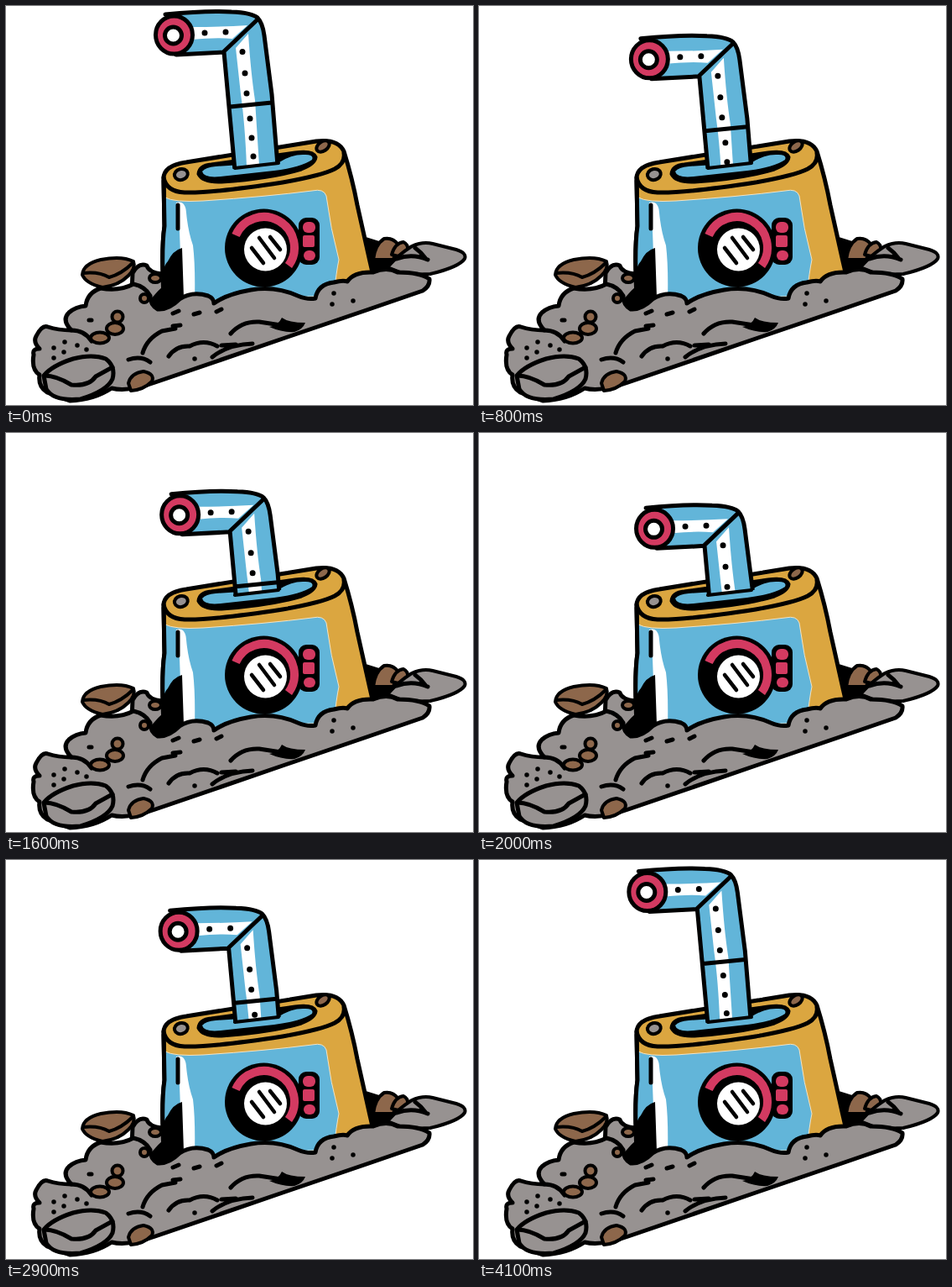
An HTML page that plays this animation: 557x475 px, repeating every 4200 ms.

```html
<!DOCTYPE html>
<html>
<head>
<meta charset="utf-8">
<style>
  html, body { margin: 0; width: 100%; height: 100%; overflow: hidden; background: #fff; }
  svg { display: block; width: 100vw; height: 100vh; stroke: #000; stroke-width: 5; stroke-linecap: round; stroke-linejoin: round; fill: none; }
  .blue { fill: #62b5d9; }
  .gold { fill: #dba640; }
  .red { fill: #d33a61; }
  .gray { fill: #979291; }
  .brown { fill: #8d674b; }
  .white { fill: #fff; }
  .ink { fill: #000; }
  .flat { stroke: none; }
  .thin { stroke-width: 4; }
</style>
</head>
<body>
<svg viewBox="0 0 557 475">
  <clipPath id="hole"><path d="M0-20H557V158L327 187 269 194 0 228Z"/></clipPath>

  <!-- rocks behind -->
  <path class="ink" d="M430 278L446 283 470 300 480 318 430 325Z"/>
  <g class="thin">
    <path class="brown" d="M438 302Q440 284 451 277Q461 275 468 284L462 302Z"/>
    <path class="brown" d="M460 296Q464 282 474 281Q480 284 479 290L468 298Z"/>
    <path class="gray" d="M455 311Q468 296 484 286Q497 280 509 283L537 290Q550 294 547 301Q540 311 506 319L478 320Z"/>
    <path d="M466 301Q484 294 503 302M488 288Q495 293 500 300" style="stroke-width:5"/>
  </g>
  <path class="gray" d="M150 340L151 318Q158 305 168 309Q170 317 186 319L200 360L150 375Z"/>

  <!-- hull -->
  <path class="gold" d="M188 208Q186 190 215 186L370 161Q396 158 403 173Q413 205 419 237L434 304L440 330L396 345L190 352Q184 300 189 262Z"/>
  <path class="blue" d="M190 228Q200 234 235 232Q310 227 365 220Q379 217 382 226Q387 265 397 302Q394 316 391 345L190 352Q184 300 189 262Z" style="stroke:#efe4c8;stroke-width:1"/>
  <path d="M188 208L189 262Q185 290 188 345"/>
  <path class="white flat" d="M203 234Q214 231 215 246Q217 268 223 285Q226 310 225 350H210L207 268Z"/>
  <path d="M205 237V265"/>
  <path class="ink flat" d="M210 288Q199 291 193 304Q185 312 188 333Q174 345 166 360Q184 368 212 347Z"/>
  <path d="M188 204Q191 221 213 222Q245 223 330 210Q376 202 392 194Q405 187 403 175"/>
  <ellipse class="gray thin" cx="209" cy="200.500" rx="8" ry="6.500" transform="rotate(-15 209 201)"/>
  <ellipse class="brown thin" cx="378" cy="167" rx="8.500" ry="5.500" transform="rotate(-35 378 167)"/>

  <!-- slot -->
  <path class="ink" d="M230 200Q231 190 245 189L345 175Q366 172 369 180Q368 188 352 194Q315 205 257 209Q235 210 230 200Z"/>
  <path class="blue flat" d="M234 197Q238 192 250 191L326 186Q340 177 354 177Q368 176 365 183Q352 192 320 196L256 203Q236 205 234 197Z"/>

  <!-- periscope -->
  <g clip-path="url(#hole)">
    <g id="pipe">
      <path class="blue flat" d="M199 9Q240 5 269 7Q293 8 300 14Q306 20 308 35L317 105L324 190L273 196L260 54L205 57Z"/>
      <path class="white flat" d="M222 25Q255 25 288 23L270 39Q250 37 222 40Z"/>
      <path class="white flat" d="M274 50L289 33Q292 80 297 112L302 190L287 191Q285 140 280 105Z"/>
      <path d="M203 58L260 55L273 196M190 10Q240 5 269 7Q293 8 300 14Q306 20 308 35L317 105L324 190M260 54L299 17M267 120L317 115"/>
      <ellipse class="red" cx="200.500" cy="34.500" rx="22" ry="22.500"/>
      <circle class="white" cx="199.500" cy="35" r="10"/>
      <path d="M237 32h0M262 31h0M282 54.500h0M285 80h0M287 104h0M291 134h0M293 157h0M295 179h0" style="stroke-width:7"/>
    </g>
  </g>
  <path class="thin" d="M273 193L325 187"/>

  <!-- porthole -->
  <rect class="ink flat" x="349" y="252" width="25" height="56" rx="9"/>
  <g class="red flat">
    <rect x="354" y="257" width="15" height="13" rx="6"/>
    <rect x="354" y="273" width="14" height="14" rx="2"/>
    <rect x="355" y="291" width="14" height="12" rx="6"/>
  </g>
  <circle class="ink flat" cx="307.500" cy="288" r="46.500"/>
  <path d="M274 273A36.500 36.500 0 1 1 337 309" style="stroke:#d33a61;stroke-width:10;stroke-linecap:butt"/>
  <circle class="white flat" cx="309.500" cy="290" r="25.500"/>
  <path d="M293 288L307 306M302 276L320 300M315 275L327 290" style="stroke-width:4.500"/>

  <!-- rubble -->
  <path class="gray" d="M36 393Q43 379 50 382Q62 386 78 386Q66 374 75 365Q83 358 95 357Q97 341 113 336Q135 340 152 331Q166 334 172 345Q172 356 181 361Q194 362 207 349Q222 339 241 345Q248 348 248 354Q263 343 292 338Q321 333 348 345Q360 350 369 348Q372 331 391 329Q402 326 407 328Q415 316 438 317Q454 310 467 317Q494 317 505 325Q506 333 497 339L430 362L330 396L178 448Q145 460 126 455Q105 469 76 470L49 460Q38 453 40 439Q30 433 33 415Q31 408 40 408Q32 400 36 393Z"/>
  <path d="M78 386Q94 386 102 399M99 374h3M163 413Q168 396 186 387L202 384M146 421Q161 416 172 424M194 417Q203 404 219 405Q236 396 252 405M246 418Q264 403 294 402M257 404L274 403M268 390Q281 375 302 376L328 380M199 366L206 363M199 381L208 380M224 367L231 365M251 364L257 361"/>
  <path class="ink flat" d="M314 382Q325 380 329 371Q337 377 357 377Q354 385 344 388Q330 389 314 382Z"/>
  <path d="M57 407h0M70 400h0M69 412h0M85 404h0M57 419h0M96 409h0M391 342h0M414 351h0M389 355h0M225 420h0" style="stroke-width:5.500"/>

  <!-- loose stones -->
  <g class="thin">
    <path class="brown" d="M91 320Q92 307 113 302Q138 297 152 304Q155 312 146 321Q134 333 115 335Q95 330 91 320Z"/>
    <path d="M92 318Q111 316 123 323Q138 319 151 306"/>
    <ellipse class="brown" cx="178" cy="324" rx="7" ry="5"/>
    <circle class="brown" cx="165" cy="348" r="5"/>
    <circle class="brown" cx="133" cy="370" r="6.500"/>
    <ellipse class="brown" cx="130" cy="384" rx="10" ry="7"/>
    <ellipse class="brown" cx="112" cy="395" rx="11" ry="6.500"/>
    <path class="brown" d="M146 449Q149 437 164 435Q178 438 174 447Q164 457 149 458Z"/>
    <path class="gray" d="M45 440Q55 428 80 420Q103 414 119 420Q131 429 127 444Q121 458 89 468Q57 471 48 456Z" style="stroke-width:5"/>
    <path d="M46 440Q60 440 78 451Q99 453 107 441L127 430" style="stroke-width:5"/>
  </g>
</svg>
<script>
  const pipe = document.getElementById('pipe');
  const STEP = 100, HALF = 21, LEG = 7;
  const path = [[0, 0], [2.3, 24.5], [6.2, 54.5], [9.5, 83.5]];

  function draw(now) {
    const step = Math.floor(now / STEP) % (2 * HALF);
    const pos = (HALF - Math.abs(HALF - step)) / LEG;
    const leg = Math.min(Math.floor(pos), path.length - 2);
    const [x, y] = path[leg].map((from, i) => from + (path[leg + 1][i] - from) * (pos - leg));
    pipe.setAttribute('transform', `translate(${x} ${y})`);
  }

  const start = performance.now();
  function tick() {
    draw(performance.now() - start);
    requestAnimationFrame(tick);
  }
  tick();
</script>
</body>
</html>
```
